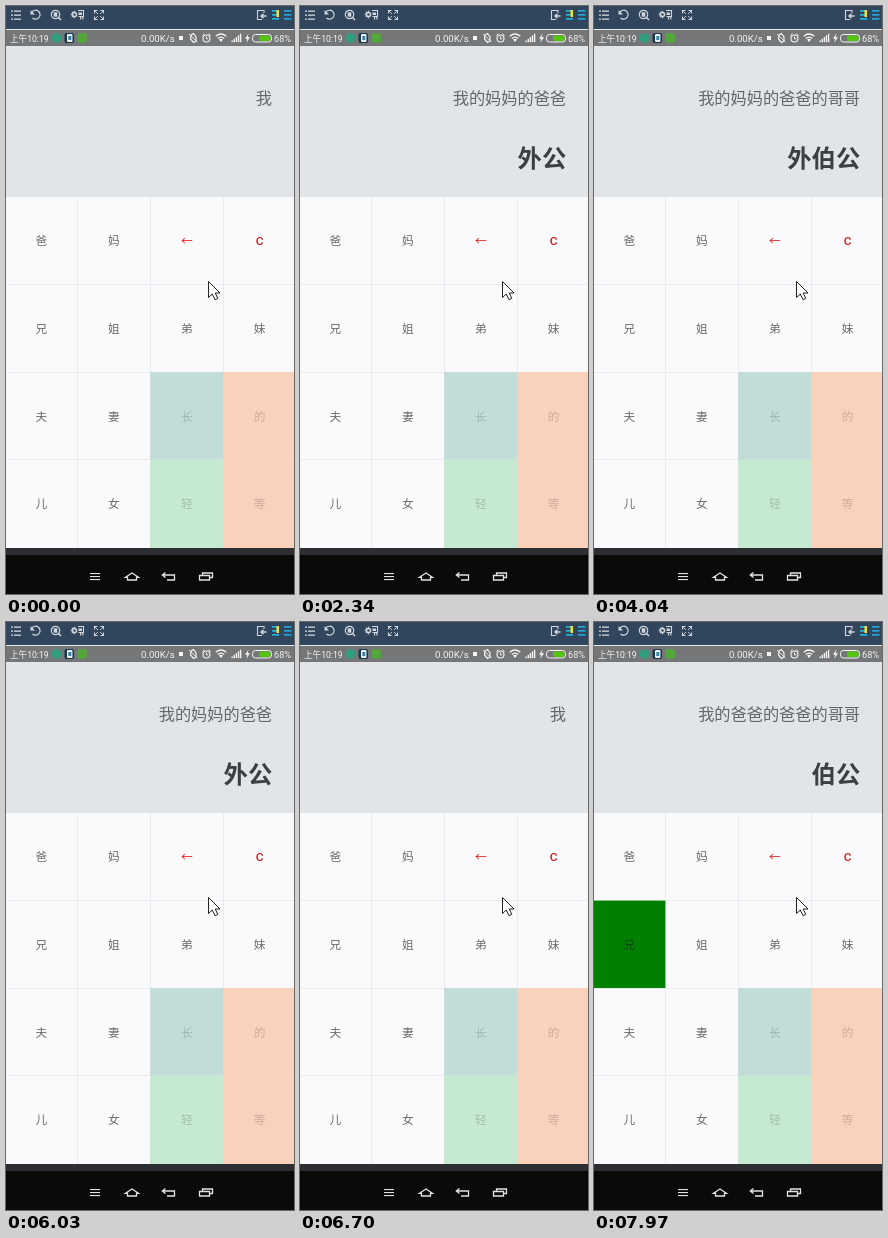
Recreate the animation shown at these times as an HTML page with a canvas. Size 288x588 px, loop 8000 ms.

```html
<!DOCTYPE html>
<html lang="zh-CN">
<head>
<meta charset="utf-8">
<title>亲戚计算器</title>
<style>
html, body { margin: 0; width: 288px; height: 588px; overflow: hidden; background: #000; }
canvas { display: block; width: 288px; height: 588px; }
</style>
</head>
<body>
<canvas id="stage"></canvas>
<script>
const W = 288, H = 588, LOOP = 8000;
const canvas = document.getElementById('stage');
const ctx = canvas.getContext('2d');
const dpr = window.devicePixelRatio || 1;
canvas.width = W * dpr;
canvas.height = H * dpr;
ctx.scale(dpr, dpr);

const CJK = '"Noto Sans CJK SC", "Noto Sans CJK", sans-serif';
const LATIN = 'Roboto, "Noto Sans CJK SC", sans-serif';
const KEYS = ['爸妈←C', '兄姐弟妹', '夫妻长的', '儿女轻等'];
const COLS = [0, 71.4, 144.2, 217, 290];
const ROWS = [191, 278.6, 366, 453.8, 542];
const MID_X = [35.4, 107.9, 180.9, 253.5];
const MID_Y = [235, 323, 410.5, 498];
const TINT = { 长: '#c2ddd7', 轻: '#c6eacf', 的: '#fad1bd', 等: '#fad1bd' };

// start time, relation chain, result, pressed key
const STATES = [
  [0, '我', '', ''],
  [500, '我的妈妈', '妈妈', ''],
  [2340, '我的妈妈的爸爸', '外公', ''],
  [3920, '我的妈妈的爸爸的哥哥', '外伯公', '兄'],
  [4040, '我的妈妈的爸爸的哥哥', '外伯公', ''],
  [6030, '我的妈妈的爸爸', '外公', ''],
  [6150, '我的妈妈', '妈妈', '←'],
  [6420, '我的妈妈', '妈妈', ''],
  [6700, '我', '', ''],
  [7520, '我的爸爸', '爸爸', '爸'],
  [7670, '我的爸爸', '爸爸', ''],
  [7820, '我的爸爸的爸爸', '爷爷', ''],
  [7970, '我的爸爸的爸爸的哥哥', '伯公', '兄']
];

function rect(x, y, w, h, color) {
  ctx.fillStyle = color;
  ctx.fillRect(x, y, w, h);
}

function text(str, x, y, font, color, align = 'left') {
  ctx.font = font;
  ctx.fillStyle = color;
  ctx.textAlign = align;
  ctx.fillText(str, x, y);
}

function stroke(d, color, width = 1) {
  ctx.strokeStyle = color;
  ctx.lineWidth = width;
  ctx.stroke(new Path2D(d));
}

function fill(d, color) {
  ctx.fillStyle = color;
  ctx.fill(new Path2D(d));
}

function disc(x, y, r, color) {
  ctx.fillStyle = color;
  ctx.beginPath();
  ctx.arc(x, y, r, 0, Math.PI * 2);
  ctx.fill();
}

function ring(x, y, r, color, width = 1) {
  ctx.strokeStyle = color;
  ctx.lineWidth = width;
  ctx.beginPath();
  ctx.arc(x, y, r, 0, Math.PI * 2);
  ctx.stroke();
}

function pill(x, y, w, h, r, color) {
  ctx.fillStyle = color;
  ctx.beginPath();
  ctx.roundRect(x, y, w, h, r);
  ctx.fill();
}

function toolbar() {
  const c = '#d2d6dc';
  rect(0, 0, W, 23, '#31455d');
  rect(0, 23, W, 1, '#e6e8ea');
  for (const y of [4.5, 8.5, 12.5]) {
    rect(5, y, 2, 1.3, c);
    rect(8, y, 7, 1.3, c);
  }
  stroke('M26 6 A4.5 4.5 0 1 1 26.5 12', c, 1.2);
  fill('M24.5 4 V8.5 H29 Z', c);
  ring(49.5, 8.5, 4.2, c, 1.2);
  rect(47.7, 6.3, 3.6, 4.4, c);
  stroke('M52.5 11.5 L55 14', c, 1.6);
  ring(68.5, 8.5, 2, c, 1.5);
  stroke('M68.5 4.8 V6 M68.5 11 V12.2 M64.8 8.5 H66 M66 6 L66.8 6.8 M66 11 L66.8 10.2', c, 1.4);
  stroke('M72 4.5 H77.5 V10.5 H72.5', c, 1.1);
  rect(72.5, 6.5, 3.5, 2.5, c);
  rect(74, 10.5, 1.2, 3, c);
  rect(76.3, 10.5, 1.2, 3, c);
  stroke('M88.5 7.5 V4.5 H91.5 M94.5 4.5 H97.5 V7.5 M97.5 10.5 V13.5 H94.5 M91.5 13.5 H88.5 V10.5', c, 1.1);
  stroke('M89 5 L92 8 M97 5 L94 8 M89 13 L92 10 M97 13 L94 10', c, 0.9);
  stroke('M258 7 V4.5 H251.5 V13.5 H256', c, 1.1);
  stroke('M255 10 H260.5 M257.5 7.8 L255 10 L257.5 12.2', c, 1.4);
  for (const y of [4, 8, 12]) {
    rect(266, y, 7, 1.7, '#25b2dc');
    rect(278, y, 7.5, 1.7, '#25a4d6');
  }
  rect(270.5, 4, 2.5, 7, '#f0e532');
}

function statusBar() {
  const c = '#f4f4f4';
  rect(0, 24, W, 16, '#757678');
  text('上午10:19', 4, 35.5, '8.6px ' + LATIN, c);
  disc(50.5, 32, 4.8, '#2f9f7f');
  pill(58.5, 27, 9.5, 10, 2, '#17364a');
  pill(61, 28, 5.5, 8, 1, '#e9f2f6');
  rect(62.3, 30, 3, 4, '#3c83ac');
  pill(71.5, 27.3, 9.5, 9.5, 2, '#55a63a');
  text('0.00K/s', 135, 35.6, '9.6px ' + LATIN, c);
  rect(173, 30, 4, 4, c);
  stroke('M185 29 L187.5 27.5 L190 31 V35 L187.5 36.5 L184.5 33 Z', c, 1.2);
  stroke('M183 28 L191.5 36', c, 0.9);
  ring(200.5, 32.5, 3.5, c, 1.1);
  stroke('M200.5 30.5 V32.8 H202.3 M196.5 29.5 L198.5 27.7 M204.5 29.5 L202.5 27.7', c, 1);
  stroke('M209.8 30.3 Q215 25.8 220.2 30.3 M211.8 32.4 Q215 29.7 218.2 32.4', c, 1.3);
  fill('M213 33.5 Q215 32 217 33.5 L215 36 Z', c);
  for (let i = 0; i < 5; i++) rect(225.5 + i * 2.1, 34.5 - i * 1.7, 1.4, 1.7 + i * 1.7, c);
  fill('M242.5 27.5 L239 32.8 H241.3 L240.3 36.8 L244 31.2 H241.7 Z', c);
  ctx.strokeStyle = c;
  ctx.lineWidth = 1;
  ctx.beginPath();
  ctx.roundRect(246.5, 28.5, 19, 7.5, 3);
  ctx.stroke();
  pill(253, 29.5, 11.5, 5.5, 2, '#54c411');
  text('68%', 268, 35.5, '9.2px ' + LATIN, c);
}

function navBar() {
  const c = '#e2e2e2';
  rect(0, 542, W, 7, '#2d2e31');
  rect(0, 549, W, H - 549, '#0b0a08');
  for (const y of [567, 570, 573]) rect(84, y, 10, 1.1, c);
  stroke('M119.5 571.3 L126 567 L132.5 571.3 H130.5 V574 H121.5 V571.3 Z', c, 1.3);
  stroke('M159.5 566.5 L156.3 569 L159.5 571.5 M156.3 569 H168.5 V574 H161', c, 1.3);
  stroke('M193.5 569.5 H203.5 V574 H193.5 Z M196.5 569 V567 H206.5 V571.5 H204', c, 1.3);
}

function keyColor(key) {
  if (key === '←') return '#e3170f';
  if (key === 'C') return '#d01812';
  return TINT[key] ? 'rgba(30,30,30,.2)' : 'rgba(30,30,30,.65)';
}

function keypad(pressed) {
  rect(0, 191, W, 351, '#fafafd');
  for (let i = 1; i < 4; i++) {
    rect(Math.floor(COLS[i]), 191, 1, 351, '#e9ebee');
    rect(0, Math.floor(ROWS[i]), W, 1, '#e9ebee');
  }
  KEYS.forEach((row, r) => [...row].forEach((key, i) => {
    const x = COLS[i], y = ROWS[r];
    const tint = key === pressed ? '#008000' : TINT[key];
    if (tint) rect(x, y, COLS[i + 1] - x, ROWS[r + 1] - y, tint);
    const isC = key === 'C';
    const font = isC ? '500 11.8px ' + LATIN : '11.7px ' + CJK;
    text(key, MID_X[i], MID_Y[r] + (isC ? 4 : 4.4), font, keyColor(key), 'center');
  }));
}

function cursor() {
  const d = 'M202.5 275.5 V291.5 L206.3 288 L209 293.7 L211.8 292.4 L209.2 287 H214 Z';
  fill(d, '#fff');
  stroke(d, '#222', 1);
}

function draw(t) {
  const [, chain, result, pressed] = STATES.filter(s => s[0] <= t).pop();
  rect(0, 40, W, 151, '#e1e5e8');
  toolbar();
  statusBar();
  text(chain, 266, 98, '16.2px ' + CJK, '#64676a', 'right');
  text(result, 266.2, 160.8, 'bold 24.3px ' + CJK, '#3c3f42', 'right');
  keypad(pressed);
  navBar();
  cursor();
}

const start = performance.now();
function tick() {
  draw((performance.now() - start) % LOOP);
  requestAnimationFrame(tick);
}
tick();
</script>
</body>
</html>
```
